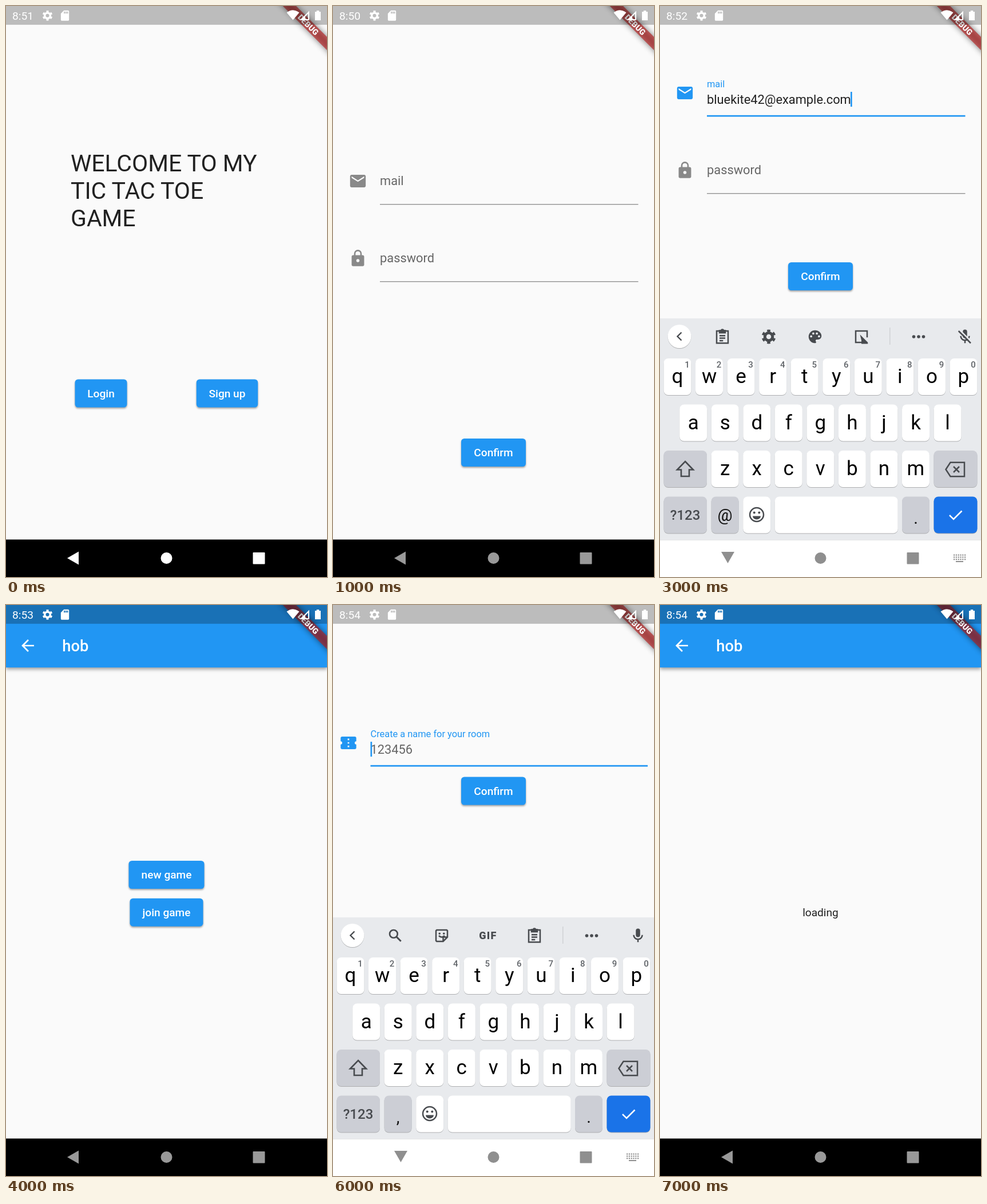
An HTML page that plays this animation: 561x998 px, repeating every 8000 ms.

```html
<!DOCTYPE html>
<html lang="en">
<head>
<meta charset="utf-8">
<title>Tic tac toe app</title>
<style>
  html, body { margin: 0; width: 100%; height: 100%; overflow: hidden; background: #fafafa; }
  svg { display: block; width: 561px; height: 998px; font-family: Roboto, sans-serif; }
  .raised { filter: drop-shadow(0 2px 1.6px rgba(0, 0, 0, .36)); }
  .bar { filter: drop-shadow(0 3px 3px rgba(0, 0, 0, .38)); }
  .key { filter: drop-shadow(0 1.3px .4px rgba(0, 0, 0, .25)); }
</style>
</head>
<body>
<svg id="stage" viewBox="0 0 561 998"></svg>
<script>
const BLUE = '#2196f3', INK = '#212121', GREY = '#666', ICON = '#898989', TOOL = '#484b4f';
const SCENE_MS = 1000;

const rect = (x, y, w, h, fill, extra = '') =>
  `<rect x="${x}" y="${y}" width="${w}" height="${h}" fill="${fill}" ${extra}/>`;
const circle = (x, y, r, fill, extra = '') =>
  `<circle cx="${x}" cy="${y}" r="${r}" fill="${fill}" ${extra}/>`;
const path = (d, fill, extra = '') => `<path d="${d}" fill="${fill}" ${extra}/>`;
const line = (d, color, width) => path(d, 'none', `stroke="${color}" stroke-width="${width}"`);
const text = (str, x, y, size, fill, extra = '') =>
  `<text x="${x}" y="${y}" font-size="${size}" fill="${fill}" ${extra}>${str}</text>`;
const MID = 'text-anchor="middle"', MEDIUM = 'font-weight="500"';

// Icons live on a 24-unit grid and take their colour from currentColor.
const C = 'currentColor';
const icons = {
  gear: circle(12, 12, 5.4, 'none', `stroke="${C}" stroke-width="4"`) +
    circle(12, 12, 8.2, 'none',
      `stroke="${C}" stroke-width="3.4" pathLength="12" stroke-dasharray="1" transform="rotate(15 12 12)"`),
  card: path('M18 2h-8L4 8v12c0 1.1.9 2 2 2h12c1.1 0 2-.9 2-2V4c0-1.1-.9-2-2-2zm-6 6h-2V4h2zm3 0h-2V4h2zm3 0h-2V4h2z', C),
  mail: path('M20 4H4c-1.1 0-2 .9-2 2v12c0 1.1.9 2 2 2h16c1.1 0 2-.9 2-2V6c0-1.1-.9-2-2-2zm0 4l-8 5-8-5V6l8 5 8-5z', C),
  lock: path('M6 8h12a2 2 0 0 1 2 2v10a2 2 0 0 1-2 2H6a2 2 0 0 1-2-2V10a2 2 0 0 1 2-2zm6 5a2 2 0 1 0 0 4a2 2 0 1 0 0-4z', C) +
    line('M8 9V6a4 4 0 0 1 8 0v3', C, 1.9),
  ticket: path('M22 10V6a2 2 0 0 0-2-2H4a2 2 0 0 0-2 2v4a2 2 0 0 1 0 4v4a2 2 0 0 0 2 2h16a2 2 0 0 0 2-2v-4a2 2 0 0 1 0-4zm-9 7.5h-2v-2h2zm0-4.5h-2v-2h2zm0-4.5h-2v-2h2z', C),
  back: path('M20 11H7.8l5.6-5.6L12 4l-8 8 8 8 1.4-1.4L7.8 13H20z', C),
  clipboard: line('M4 4h16v17H4zM8 10.5h8M8 14h8M8 17.5h5', C, 2) + rect(7, 2.5, 10, 5, C) + circle(12, 3.5, 2.5, C),
  palette: path('M12 3a9 9 0 0 0 0 18c1.4 0 2-1.400 1.100-2.500-.9-1 0-2.500 1.400-2.500H16a5 5 0 0 0 5-5c0-4.400-4-8-9-8z', C) +
    [[6.5, 11.5], [9.5, 7.5], [14.5, 7.5], [17.5, 11.5]].map(p => circle(...p, 1.5, '#e8eaed')).join(''),
  resize: line('M20 13V4H4v16h8', C, 2) + path('M10 9l11 11v2h-9v-5z', C),
  search: circle(9.5, 9.5, 5.5, 'none', `stroke="${C}" stroke-width="2.1"`) + line('M13.5 13.500l6.300 6.300', C, 2.3),
  sticker: line('M5 4h14l1 1v9l-6 6H5l-1-1V5zM20 14h-6v6M8 12q4 4 8 0', C, 2) +
    circle(9, 9, 1.4, C) + circle(15, 9, 1.4, C),
  mic: rect(9, 2, 6, 12, C, 'rx="3"') + line('M6 11a6 6 0 0 0 12 0M12 17v4', C, 2),
};
icons.micOff = icons.mic + line('M4.500 2.500l17 17', '#e8eaed', 2) + line('M3 4l17 17', C, 2);

const icon = (name, x, y, size, color) =>
  `<g color="${color}" transform="translate(${x - size / 2} ${y - size / 2}) scale(${size / 24})">${icons[name]}</g>`;

const button = (label, y, w, x = 280.5) =>
  rect(x - w / 2, y, w, 49, BLUE, 'rx="5.5" class="raised"') +
  text(label, x, y + 31.3, 19.1, '#fff', `${MID} ${MEDIUM}`);

// A text field, placed by the centre of its icon; focused fields float their label.
function field(name, label, iconX, y, right, focus) {
  const x = iconX + 38.5, w = right - x;
  const head = icon(name, iconX, y, 32.8, focus ? BLUE : ICON);
  if (!focus) return head + text(label, x, y + 7, 21.84, GREY) + rect(x, y + 40, w, 1.4, '#929292');
  return head + text(label, x, y - 10, 16.4, BLUE) + rect(x, y + 38.8, w, 2.7, BLUE) +
    text(focus.value, x, y + 18.5, 21.84, focus.color) +
    rect(x + focus.caret, y - 2, 2.7, 26, BLUE);
}

function statusBar(clock) {
  const banner = `<g transform="translate(561) rotate(45)">
    ${rect(-70, 38.2, 140, 16.4, '#000', 'opacity=".5" style="filter:blur(5.4px)"')}
    ${rect(-70, 38.2, 140, 16.4, '#b71c1c', 'opacity=".63"')}
    ${text('DEBUG', 0, 51.3, 13.9, '#fff', `${MID} font-weight="900"`)}</g>`;
  return banner + rect(0, 0, 561, 32.8, '#000', 'opacity=".25"') +
    text(clock, 11, 24, 19.2, '#fff') +
    icon('gear', 72.5, 16.8, 21.5, '#fff') + icon('card', 103, 16.8, 21.5, '#fff') +
    path('M501.500 24.500L490.500 11.500Q501.500 3 512.500 11.500z', '#fff') +
    path('M530 8.500v16.500h-16.500zm-2 5l-5 5v4.500h5z', '#fff', 'fill-rule="evenodd"') +
    path('M540 10h2.800V8h4.400v2h2.800v15h-10z', '#fff');
}

function navBar(color, keyboardOpen) {
  let out = rect(0, 932.5, 561, 65.5, keyboardOpen ? '#fff' : '#000') +
    path(keyboardOpen ? 'M107 954h23l-11.500 20z' : 'M107 965l20-11.500v23z', color) +
    circle(280.5, 965, 10, color) + rect(431.5, 955, 21, 20.5, color, 'rx="1"');
  if (keyboardOpen) {
    out += rect(0, 932.5, 561, 1.5, '#e3e4e6') + rect(517, 970, 13, 2, color);
    for (let i = 0; i < 18; i++) out += rect(513 + i % 6 * 3.8, 958.5 + (i / 6 | 0) * 3.8, 2.2, 2.2, color);
  }
  return out;
}

function keyboard(tools, symbol) {
  const PITCH = 55.55, SPECIAL = '#ccced5';
  const key = (x, y, w = 48, fill = '#fff') => rect(x, y, w, 64, fill, 'rx="8" class="key"');
  let out = rect(0, 546, 561, 387, '#e8eaed') + circle(34, 577.5, 20.5, '#fff', 'class="key"') +
    line('M37.500 570.500l-7 7 7 7', TOOL, 2.4) + rect(401, 562, 1.5, 30, '#cfd1d5');
  tools.forEach((name, i) => {
    const x = [109, 190, 271, 352, 533][i];
    out += name === 'GIF'
      ? text(name, x, 584, 18, TOOL, `${MID} font-weight="900" letter-spacing="1.3"`)
      : icon(name, x, 578, 30, TOOL);
  });
  for (const x of [443.5, 452, 460.5]) out += circle(x, 578, 2.8, TOOL);

  [['qwertyuiop', 6.5, 616], ['asdfghjkl', 34.2, 696.5], ['zxcvbnm', 89.6, 777]].forEach(([letters, left, y], row) =>
    [...letters].forEach((ch, i) => {
      const x = left + i * PITCH;
      out += key(x, y) + text(ch, x + 24, y + 43, 35, '#000', MID);
      if (row === 0) out += text((i + 1) % 10, x + 41, y + 16, 15, '#5f6368', `${MID} ${MEDIUM}`);
    }));

  out += key(6.5, 777, 75.5, SPECIAL) + key(478.5, 777, 76, SPECIAL) +
    line('M44 796l14 14.500h-7v11.500h-14v-11.500h-7z', TOOL, 2.6) +
    line('M499.500 810l8-12.300h24.500v24.600h-24.500zM513 805l10 10m0-10l-10 10', TOOL, 2.5);

  const y = 857.5;
  out += key(6.5, y, 75.5, SPECIAL) + text('?123', 44, 898, 24, TOOL, `${MID} ${MEDIUM}`) +
    key(89.6, y, 48, SPECIAL) + text(symbol, 113.5, symbol === '@' ? 900 : 905, 29, '#111', MID) +
    key(145.2, y) + circle(169, 889, 12, 'none', `stroke="${TOOL}" stroke-width="2.5"`) +
    circle(164.7, 885.5, 2, TOOL) + circle(173.3, 885.5, 2, TOOL) +
    path('M162 891.500h14a7 6 0 0 1-14 0z', TOOL) +
    key(200.7, y, 215) + key(423, y, 48, SPECIAL) + text('.', 447, 905, 29, '#111', MID) +
    key(478.5, y, 76, '#1a73e8') + line('M506 890l7 7 14.500-14.500', '#fff', 2.6);
  return out;
}

const appBar = rect(0, 0, 561, 109.2, BLUE, 'class="bar"') +
  icon('back', 38, 71, 32.8, '#fff') + text('hob', 98.3, 81, 27.3, '#fff', MEDIUM);

const page = (clock, body, bottom = navBar('#999')) =>
  rect(0, 0, 561, 998, '#fafafa') + body + statusBar(clock) + bottom;

const mailPage = (clock, value, caret) => page(clock,
  field('mail', 'mail', 43.5, 152, 533.5, { value, caret, color: INK }) +
  field('lock', 'password', 43.5, 287, 533.5) + button('Confirm', 448, 113),
  keyboard(['clipboard', 'gear', 'palette', 'resize', 'micOff'], '@') + navBar('#8f8f8f', true));

const scenes = [
  page('8:51',
    ['WELCOME TO MY', 'TIC TAC TOE', 'GAME'].map((s, i) => text(s, 113, 289 + i * 48, 40.96, INK)).join('') +
    button('Login', 652.5, 91, 166) + button('Sign up', 652.5, 107.5, 386.5), navBar('#fff')),
  page('8:50',
    field('mail', 'mail', 43.5, 306, 533.5) + field('lock', 'password', 43.5, 441, 533.5) +
    button('Confirm', 756, 113)),
  mailPage('8:51', '', 0),
  mailPage('8:52', 'bluekite42@example.com', 251),
  page('8:53', appBar + button('new game', 447, 132) + button('join game', 512.7, 128)),
  page('8:53', field('ticket', 'Create a name for your room', 27, 434.5, 550) + button('Confirm', 494, 113)),
  page('8:54',
    field('ticket', 'Create a name for your room', 27, 241, 550, { value: '123456', caret: 0, color: GREY }) +
    button('Confirm', 300.5, 113),
    keyboard(['search', 'sticker', 'GIF', 'clipboard', 'mic'], ',') + navBar('#8f8f8f', true)),
  page('8:54', appBar + text('loading', 280.5, 544.3, 19.1, INK, MID)),
];

const stage = document.getElementById('stage');
stage.innerHTML = scenes.map(s => `<g display="none">${s}</g>`).join('');
const groups = [...stage.children];

function draw() {
  const current = Math.floor(performance.now() / SCENE_MS) % scenes.length;
  groups.forEach((g, i) => g.setAttribute('display', i === current ? 'inline' : 'none'));
  requestAnimationFrame(draw);
}
draw();
</script>
</body>
</html>
```
